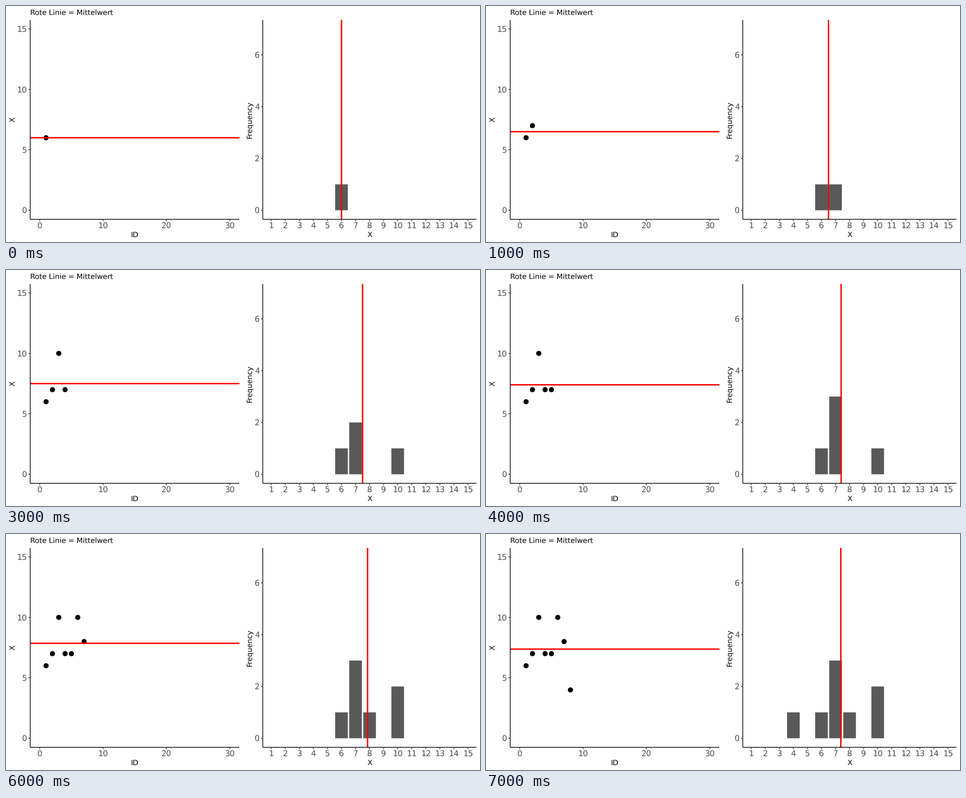
These frames come from a looping animation (1058 px wide and 529 px high, 8 s). A matplotlib script:

```python
import matplotlib.pyplot as plt
from matplotlib.animation import FuncAnimation
from matplotlib.patches import Circle, Rectangle
from matplotlib.textpath import TextPath

plt.rcParams.update({
    "font.family": "DejaVu Sans",
    "path.snap": False,
    "text.hinting": "none",
    "lines.solid_capstyle": "butt",
})

WIDTH, HEIGHT, DPI = 1058, 529, 105.8
PT = DPI / 72  # pixels per point
TITLE_PT, LABEL_PT = 11, 12
TOP, BOTTOM = 31.1, 478.2
LINE_PT = 1.067
VALUES = [6, 7, 10, 7, 7, 10, 8, 4]

fig = plt.figure(figsize=(WIDTH / DPI, HEIGHT / DPI), dpi=DPI, facecolor="white")
ax = fig.add_axes([0, 0, 1, 1])
ax.set(xlim=(0, WIDTH), ylim=(HEIGHT, 0))
ax.axis("off")


def put_text(x, y, text, size, color="black", align=0, upright=False):
    """Place text on its baseline; align is 0 (start), 0.5 or 1 (end)."""
    box = TextPath((0, 0), text, size=size * PT).get_extents()
    shift = align * (box.x0 + box.x1)
    if upright:
        y += shift
    else:
        x -= shift
    ax.text(x, y, text, fontsize=size, color=color, ha="left", va="baseline",
            rotation=90 if upright else 0, rotation_mode="anchor")


def segment(xs, ys, color="black", width=LINE_PT, zorder=5):
    return ax.plot(xs, ys, color=color, lw=width, zorder=zorder)[0]


class Panel:
    """A plot area that maps data values to stage pixels."""

    def __init__(self, left, right, xlim, ylim):
        self.left, self.right = left, right
        self.xlim, self.ylim = xlim, ylim

    def x(self, value):
        low, high = self.xlim
        return self.left + (value - low) / (high - low) * (self.right - self.left)

    def y(self, value):
        low, high = self.ylim
        return BOTTOM - (value - low) / (high - low) * (BOTTOM - TOP)

    def draw_axes(self, xticks, yticks, xlabel, ylabel, ylabel_x):
        tick = 2.75 * PT
        gap = tick + 2.2 * PT
        cap = 0.72 * LABEL_PT * PT
        for value in xticks:
            px = self.x(value)
            segment([px, px], [BOTTOM, BOTTOM + tick], "#333333")
            put_text(px, BOTTOM + gap + cap, str(value), LABEL_PT, "#4d4d4d", 0.5)
        for value in yticks:
            py = self.y(value)
            segment([self.left - tick, self.left], [py, py], "#333333")
            put_text(self.left - gap, py + cap / 2, str(value), LABEL_PT, "#4d4d4d", 1)
        segment([self.left, self.right], [BOTTOM, BOTTOM], zorder=6)
        segment([self.left, self.left], [TOP, BOTTOM], zorder=6)
        put_text((self.left + self.right) / 2, 517.5, xlabel, TITLE_PT, align=0.5)
        put_text(ylabel_x, (TOP + BOTTOM) / 2, ylabel, TITLE_PT, align=0.5, upright=True)


scatter = Panel(54.1, 520.9, (-1.5, 31.5), (-0.75, 15.75))
scatter.draw_axes(range(0, 31, 10), range(0, 16, 5), "ID", "X", 19.7)
hist = Panel(573.2, 1049.9, (0.4, 15.6), (-0.35, 7.35))
hist.draw_axes(range(1, 16), range(0, 7, 2), "X", "Frequency", 548.7)
put_text(scatter.left, 19.7, "Rote Linie = Mittelwert", TITLE_PT)

dots = [ax.add_patch(Circle((scatter.x(i), scatter.y(v)), 5.75, fc="black", lw=0, zorder=2))
        for i, v in enumerate(VALUES, 1)]
bar_width = hist.x(0.9) - hist.x(0)
bars = {v: ax.add_patch(Rectangle((hist.x(v - 0.45), hist.y(0)), bar_width, 0,
                                  fc="#595959", lw=0, zorder=2))
        for v in sorted(set(VALUES))}
mean_row = segment([scatter.left, scatter.right], [0, 0], "red", 2 * LINE_PT, 3)
mean_column = segment([0, 0], [TOP, BOTTOM], "red", 2 * LINE_PT, 3)


def update(frame):
    seen = VALUES[:frame + 1]
    mean = sum(seen) / len(seen)
    for i, dot in enumerate(dots):
        dot.set_visible(i <= frame)
    for value, bar in bars.items():
        count = seen.count(value)
        bar.set_visible(count > 0)
        bar.set_height(hist.y(count) - hist.y(0))
    mean_row.set_ydata([scatter.y(mean)] * 2)
    mean_column.set_xdata([hist.x(mean)] * 2)
    return [*dots, *bars.values(), mean_row, mean_column]


anim = FuncAnimation(fig, update, frames=len(VALUES), interval=1000, repeat=True)
plt.show()
```
